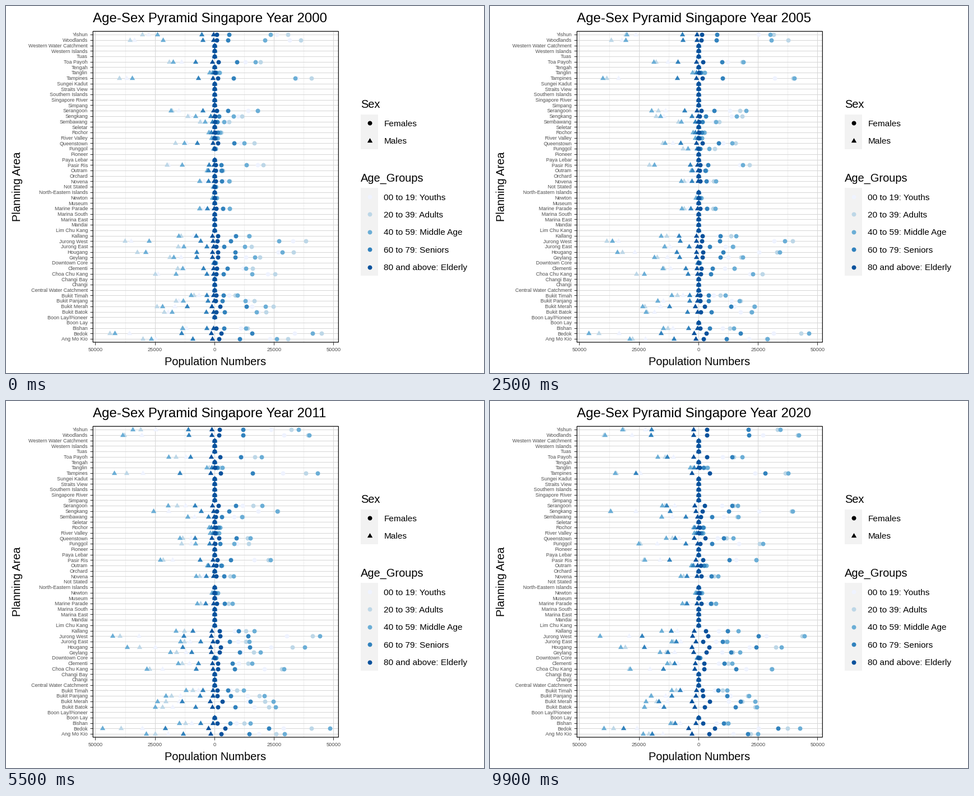
These frames come from a looping animation (853x656 px, 10 s). A matplotlib script:

```python
import numpy as np
import matplotlib.pyplot as plt
from matplotlib.animation import FuncAnimation
from matplotlib.patches import Rectangle

W, H, DPI = 853, 656, 64
PT = 72 / DPI  # points per pixel
FRAMES = 100
LAST = FRAMES - 1
plt.rcParams["font.family"] = "Liberation Sans"

BLUES = ["#EFF3FF", "#BDD7E7", "#6BAED6", "#3182BD", "#08519C"]
AGES = ["00 to 19: Youths", "20 to 39: Adults", "40 to 59: Middle Age",
        "60 to 79: Seniors", "80 and above: Elderly"]
AREAS = (
    "Yishun, Woodlands, Western Water Catchment, Western Islands, Tuas, "
    "Toa Payoh, Tengah, Tanglin, Tampines, Sungei Kadut, Straits View, "
    "Southern Islands, Singapore River, Simpang, Serangoon, Sengkang, "
    "Sembawang, Seletar, Rochor, River Valley, Queenstown, Punggol, Pioneer, "
    "Paya Lebar, Pasir Ris, Outram, Orchard, Novena, Not Stated, "
    "North-Eastern Islands, Newton, Museum, Marine Parade, Marina South, "
    "Marina East, Mandai, Lim Chu Kang, Kallang, Jurong West, Jurong East, "
    "Hougang, Geylang, Downtown Core, Clementi, Choa Chu Kang, Changi Bay, "
    "Changi, Central Water Catchment, Bukit Timah, Bukit Panjang, "
    "Bukit Merah, Bukit Batok, Boon Lay/Pioneer, Boon Lay, Bishan, Bedok, "
    "Ang Mo Kio").split(", ")

# Men in hundreds: adults, middle-aged and seniors at the start,
# then middle-aged at the end. Everything else follows from these.
TOWNS = {
    "Yishun": (303, 239, 53, 320), "Woodlands": (356, 217, 50, 394),
    "Toa Payoh": (190, 175, 81, 172), "Tanglin": (15, 21, 7, 36),
    "Tampines": (400, 345, 69, 351), "Serangoon": (178, 184, 49, 153),
    "Sengkang": (112, 81, 16, 370), "Sembawang": (60, 40, 10, 156),
    "Rochor": (27, 24, 13, 20), "River Valley": (14, 12, 4, 18),
    "Queenstown": (164, 128, 72, 137), "Punggol": (5, 5, 1, 252),
    "Pasir Ris": (200, 136, 24, 226), "Outram": (34, 30, 26, 31),
    "Novena": (62, 63, 26, 76), "Not Stated": (8, 4, 2, 4),
    "Newton": (8, 9, 3, 13), "Marine Parade": (62, 64, 30, 69),
    "Kallang": (140, 150, 77, 156), "Jurong West": (376, 276, 59, 415),
    "Jurong East": (153, 130, 34, 112), "Hougang": (325, 290, 76, 326),
    "Geylang": (188, 172, 75, 163), "Downtown Core": (5, 5, 3, 6),
    "Clementi": (156, 134, 47, 132), "Choa Chu Kang": (250, 162, 33, 288),
    "Bukit Timah": (86, 99, 33, 112), "Bukit Panjang": (163, 131, 28, 199),
    "Bukit Merah": (243, 219, 116, 222), "Bukit Batok": (212, 179, 36, 228),
    "Bishan": (136, 135, 34, 117), "Bedok": (440, 419, 138, 398),
    "Ang Mo Kio": (302, 267, 92, 232),
}


def populate():
    """Population by sex, age group, area and time, men negative."""
    u = np.linspace(0, 1, FRAMES)
    late = u ** 1.6

    def between(a, b, ease=u):
        return a[:, None] + (b - a)[:, None] * ease

    adults, middle, seniors, middle_end = np.array(
        list(TOWNS.values()), dtype=float).T
    old = seniors / adults
    # The middle-aged of the first year become the seniors of the last
    seniors_end = 0.56 * middle + 0.2 * middle_end
    # Young towns swell midway, brand-new ones fill up later
    boom = np.log(np.maximum(middle_end / middle / 2, 1))
    swell = 0.28 - 0.4 * old - 0.2 * boom

    men = np.array([
        between(adults * (1.05 - 0.75 * old),
                middle_end * (0.76 - 0.35 * old)),
        between(adults, middle_end * (1.1 - 0.65 * old)),
        between(middle, middle_end)
        * (1 + swell[:, None] * 4 * u * (1 - u)),
        between(seniors, seniors_end, late),
        between(0.11 * seniors, 0.15 * seniors + 0.07 * seniors_end, late),
    ])
    ratio = between(np.array([0.94, 1.02, 0.98, 1.15, 1.8]),
                    np.array([0.97, 1.05, 1.07, 1.06, 1.6]))

    people = np.zeros((2, len(AGES), len(AREAS), FRAMES))
    where = [AREAS.index(name) for name in TOWNS]
    people[0][:, where] = men * ratio[:, None]
    people[1][:, where] = -men
    # Areas that leave after the first year or join in the second
    for name in ("Not Stated", "Boon Lay/Pioneer"):
        people[:, :, AREAS.index(name), 1:] = np.nan
    for name in ("Pioneer", "Boon Lay"):
        people[:, :, AREAS.index(name), :5] = np.nan
    return people


people = populate()

fig = plt.figure(figsize=(W / DPI, H / DPI), dpi=DPI, facecolor="white")
ax = fig.add_axes([0, 0, 1, 1])
ax.set_xlim(0, W)
ax.set_ylim(H, 0)
ax.axis("off")

LEFT, RIGHT, TOP, BOTTOM = 155.2, 593.3, 45.3, 601
X0, SCALE = 372, 0.425  # zero line, pixels per hundred
rows = np.linspace(51.2, 595.2, len(AREAS))


def text(x, y, s, size, color="black", **kw):
    return ax.text(x, y, s, fontsize=size * PT, color=color,
                   va="baseline", **kw)


def dots(x, y, sex, color, z=4):
    if sex == 0:
        style = dict(marker="o", s=(7.9 * PT) ** 2)
    else:
        tri = [(-4.44, -2.57), (4.44, -2.57), (0, 5.13)]
        style = dict(marker=tri, s=(10.8 * PT) ** 2)
    return ax.scatter(x, y, color=color, linewidths=0, zorder=z, **style)


# Panel
minor = X0 + SCALE * np.arange(-375, 376, 250)
major = X0 + SCALE * np.arange(-500, 501, 250)
ax.vlines(minor, TOP, BOTTOM, color="#E4E4E4", lw=0.6 * PT, zorder=1)
ax.vlines(major, TOP, BOTTOM, color="#D6D6D6", lw=PT, zorder=1)
ax.hlines(rows, LEFT, RIGHT, color="#D6D6D6", lw=PT, zorder=1)
ax.add_patch(Rectangle((LEFT, TOP), RIGHT - LEFT, BOTTOM - TOP, fill=False,
                       ec="black", lw=1.2 * PT, zorder=6, snap=False))
ax.hlines(rows, LEFT - 5, LEFT, color="#333333", lw=PT, zorder=5)
ax.vlines(major, BOTTOM, BOTTOM + 5, color="#333333", lw=PT, zorder=5)
for y, name in zip(rows, AREAS):
    text(146, y + 3.3, name, 9, "#4D4D4D", ha="right")
for x, n in zip(major, (50000, 25000, 0, 25000, 50000)):
    text(x, 617.3, str(n), 9.4, "#4D4D4D", ha="center")

title = text(155, 29, "", 24)
text(374, 642, "Population Numbers", 20, ha="center")
text(26.3, 323, "Planning Area", 20, ha="center", rotation=90,
     rotation_mode="anchor")

# Legends
STEP = 31.4


def legend(y, heading, entries):
    text(633, y, heading, 20)
    ax.add_patch(Rectangle((633, y + 11.5), 31.5, STEP * len(entries),
                           fc="#F2F2F2", lw=0))
    for i, (label, sex, color) in enumerate(entries):
        cy = y + 11.7 + STEP * (i + 0.5)
        dots([649], [cy], sex, color)
        text(674.5, cy + 5.6, label, 15.4)


legend(182, "Sex", [("Females", 0, "black"), ("Males", 1, "black")])
legend(313.6, "Age_Groups", [(a, 0, c) for a, c in zip(AGES, BLUES)])

layers = [[dots(np.full(len(AREAS), X0), rows, sex, color, 3 + age / 10)
           for age, color in enumerate(BLUES)] for sex in (0, 1)]


def draw(i):
    year = 2000 + 20 * i // LAST
    title.set_text(f"Age-Sex Pyramid Singapore Year {year}")
    for sex in (0, 1):
        for age in range(len(AGES)):
            x = X0 + SCALE * people[sex, age, :, i]
            layers[sex][age].set_offsets(np.column_stack([x, rows]))
    return [title, *layers[0], *layers[1]]


anim = FuncAnimation(fig, draw, frames=FRAMES, init_func=lambda: draw(0),
                     interval=100, repeat=True, repeat_delay=0)
plt.show()
```
